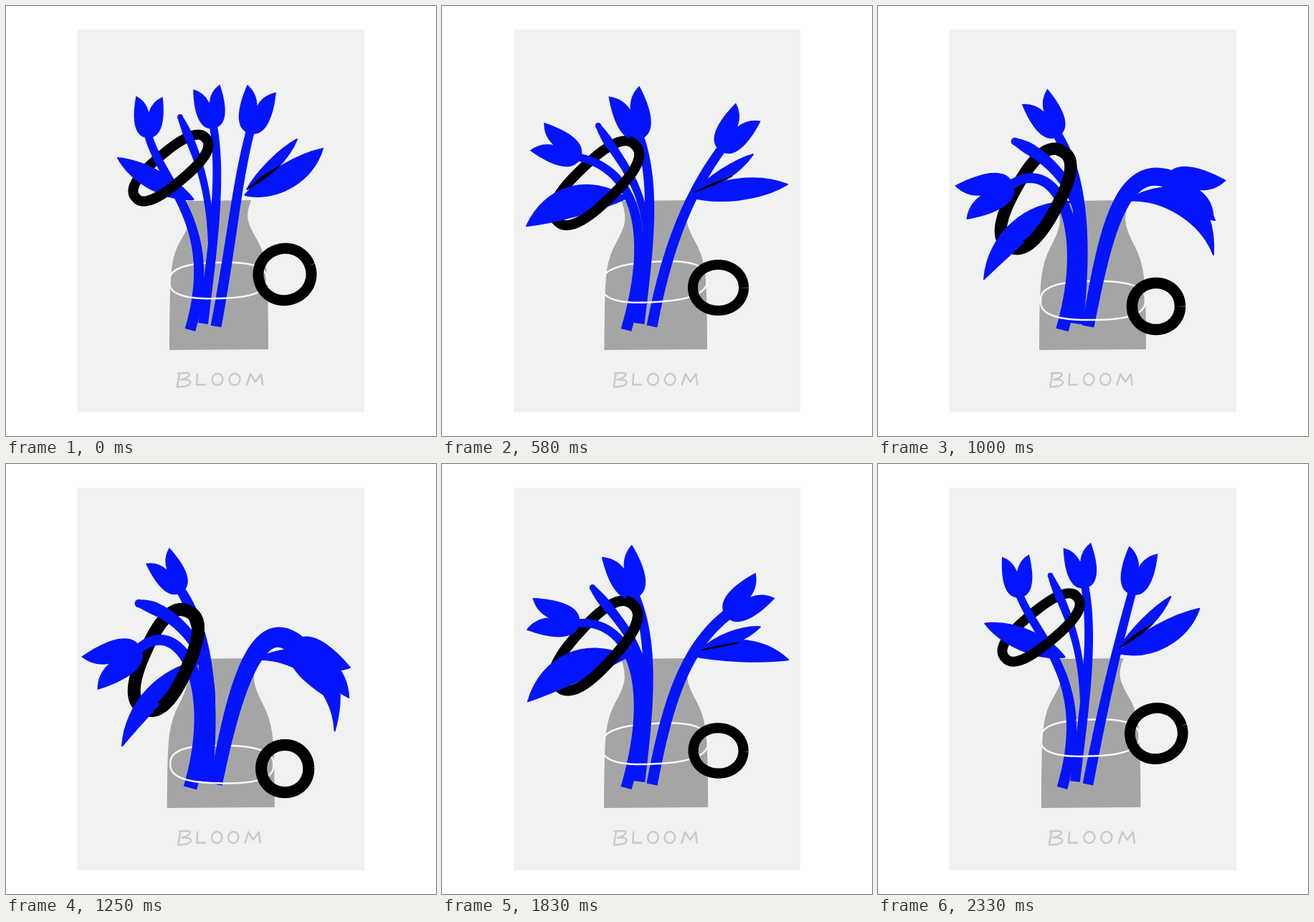
Animation, 600 px wide and 600 px high, one loop 2410 ms. Source, as an HTML page with a canvas:

```html
<!DOCTYPE html>
<html lang="en">
<head>
<meta charset="utf-8">
<title>Bloom</title>
<style>
  html, body { margin: 0; width: 100%; height: 100%; overflow: hidden; background: #fff; }
  canvas { display: block; width: 600px; height: 600px; }
</style>
</head>
<body>
<canvas id="stage" role="img" aria-label="BLOOM: blue tulips wilting in a vase"></canvas>
<script>
const BLUE = '#0414ff', INK = '#000', GLASS = '#a5a5a5', PAPER = '#f0f2f2', CHALK = '#f6f7f7', LETTER = '#c8caca';

// Drawn at 12 pictures a second, most of them held for two ticks.
const LOOP = 2410, TICK = 1000 / 12;
const cuts = [0, 2, 3, 5, 7, 9, 10, 12, 13, 15, 17, 18, 20, 22, 23, 25, 26, 28].map(n => Math.round(n * TICK / 10) * 10);
// How far the bouquet has wilted; the loop runs down this list and back up.
const wilting = [0, .05, .16, .33, .5, .65, .83, 1, 1.07, 1.1];

// Each moving value has three keys: fresh, halfway, wilted.
const flowers = [
  { base: [[198, 184], [193, 213], [189, 249]], angle: [2, -63, -109], size: [58, 68, 78],
    lean: -18, belly: [300, 303], foot: [257, 452], top: [11, 11, 13], end: [15, 15, 18] },
  { base: [[290, 171], [277, 186], [252, 182]], angle: [-10, -19, -31], size: [59, 71, 65],
    lean: 0, belly: [288, 340], foot: [275, 443], top: [11, 12, 13], end: [14, 15, 23] },
  { base: [[340, 178], [388, 202], [402, 240]], angle: [15, 36, 110], size: [65, 67, 80],
    lean: 0, belly: [315, 330], foot: [293, 447], top: [12, 13, 26], end: [15, 15, 17], lead: .2 }
];
// Leaves bulge by so many pixels to either side of the line from base to tip.
const leaves = {
  left: { base: [[262, 270], [258, 268], [268, 273]], tip: [[156, 212], [118, 307], [148, 381]], bulge: [[11, -16], [36, -5], [32, 1]] },
  small: { base: [[336, 256], [352, 260], [390, 255]], tip: [[406, 186], [434, 207], [470, 299]], bulge: [[-6, 9], [-6, 9], [-18, 7]] },
  right: { base: [[333, 264], [345, 266], [345, 272]], tip: [[442, 199], [482, 249], [468, 347]], bulge: [[-9, 24], [-16, 13], [-56, -23]] }
};
const bud = { tip: [[243, 155], [218, 167], [191, 189]], bend: [[265, 205], [245, 214], [232, 207]], width: [13, 14, 18] };
// Ovals: centre, radii, degrees, line width
const water = [[296, 383, 68, 25, -1.5, 2.5], [296, 385, 74, 28, -3.5, 2.5], [300, 411, 73, 27, -.5, 2.5]];
const bigRing = [[230, 226, 64, 22, -40, 14], [215, 247, 76, 28, -44, 14], [220, 269, 76, 31, -61, 17]];
const smallRing = [[389, 374.5, 37, 36, -20, 15], [385.5, 393, 35.5, 32, 0, 14], [388, 419, 33.5, 32.5, 0, 15.5]];
const jarSide = [[252, 272], [259, 290], [253, 312], [235, 341], [228, 385], [228, 480]];

const canvas = document.getElementById('stage');
const ctx = canvas.getContext('2d');
const dpr = window.devicePixelRatio || 1;
canvas.width = canvas.height = 600 * dpr;

// Parabola through the three keys, for numbers or lists of numbers
function at([a, b, c], u) {
  if (Array.isArray(a)) return a.map((v, i) => at([v, b[i], c[i]], u));
  return a + u * (4 * b - 3 * a - c) + u * u * 2 * (a - 2 * b + c);
}

function bezier(a, b, c, d, steps = 32) {
  return Array.from({ length: steps + 1 }, (_, i) => {
    const t = i / steps, s = 1 - t;
    return [0, 1].map(n => s * s * s * a[n] + 3 * s * s * t * b[n] + 3 * s * t * t * c[n] + t * t * t * d[n]);
  });
}

function fill(pts, color) {
  ctx.beginPath();
  pts.forEach(p => ctx.lineTo(p[0], p[1]));
  ctx.closePath();
  ctx.fillStyle = color;
  ctx.fill();
}

// Band along a curve, its width given as a function of 0..1
function band(pts, width, color) {
  const left = [], right = [], last = pts.length - 1;
  pts.forEach((p, i) => {
    const a = pts[Math.max(0, i - 1)], b = pts[Math.min(last, i + 1)];
    const dx = b[0] - a[0], dy = b[1] - a[1];
    const r = width(i / last) / 2 / Math.hypot(dx, dy);
    left.push([p[0] - dy * r, p[1] + dx * r]);
    right.unshift([p[0] + dy * r, p[1] - dx * r]);
  });
  fill(left.concat(right), color);
}

// Step of a given length in a direction counted from straight up
function step([x, y], deg, length) {
  const a = deg * Math.PI / 180;
  return [x + Math.sin(a) * length, y - Math.cos(a) * length];
}

function head(base, deg, size) {
  ctx.save();
  ctx.translate(...base);
  ctx.rotate(deg * Math.PI / 180);
  ctx.scale(size, size);
  ctx.beginPath();
  ctx.moveTo(-.32, -1);
  ctx.quadraticCurveTo(-.07, -.88, 0, -.62);
  ctx.quadraticCurveTo(.07, -.88, .32, -1);
  ctx.bezierCurveTo(.4, -.5, .36, 0, 0, 0);
  ctx.bezierCurveTo(-.36, 0, -.4, -.5, -.32, -1);
  ctx.restore();
  ctx.fillStyle = BLUE;
  ctx.fill();
}

// The stem leaves the head along its axis and curves down to a fixed foot.
function flower(f, u) {
  const v = u + (f.lead || 0) * Math.max(0, u < .5 ? Math.sin(2 * Math.PI * u) : 0);
  const base = at(f.base, v), deg = at(f.angle, v);
  const top = at(f.top, u), end = at(f.end, u);
  const curve = bezier(step(base, deg, 5), step(base, deg + f.lean, -70), f.belly, f.foot);
  band(curve, t => top + (end - top) * t, BLUE);
  head(base, deg, at(f.size, v));
}

function leaf(l, u) {
  const [bx, by] = at(l.base, u), [tx, ty] = at(l.tip, u);
  const dx = tx - bx, dy = ty - by, length = Math.hypot(dx, dy);
  const side = (t, off) => [bx + dx * t - dy / length * off * 4 / 3, by + dy * t + dx / length * off * 4 / 3];
  const [a, b] = at(l.bulge, u);
  ctx.beginPath();
  ctx.moveTo(bx, by);
  ctx.bezierCurveTo(...side(.28, a), ...side(.72, a), tx, ty);
  ctx.bezierCurveTo(...side(.72, b), ...side(.28, b), bx, by);
  ctx.fillStyle = ctx.strokeStyle = BLUE;
  ctx.lineWidth = 2;
  ctx.lineJoin = 'round';
  ctx.fill();
  ctx.stroke();
}

// Dark gap under the small leaf, closing as the leaves fall together
function crease(u) {
  const w = 5 * (1 - u);
  if (w < .5) return;
  const [bx, by] = at(leaves.small.base, u), [tx, ty] = at(leaves.small.tip, u);
  const end = [bx + (tx - bx) * .6 + 4, by + (ty - by) * .6 + 9];
  const mid = [(bx + end[0]) / 2, (by + end[1]) / 2];
  band(bezier([bx, by], mid, mid, end), t => 1.5 + w * .75 * Math.sin(Math.PI * t), INK);
}

function drawBud(u) {
  const tip = at(bud.tip, u), w = at(bud.width, u);
  const curve = bezier(tip, at(bud.bend, u), [284, 248], [286, 330]);
  band(curve, t => w * Math.min(1, Math.sqrt(.3 + t * 5)) * (1 - .35 * t), BLUE);
  ctx.beginPath();
  ctx.arc(...tip, w * .3, 0, 7);
  ctx.fill();
}

// The jar sags: its shoulders sink and its right side swells.
function jar(u) {
  const sink = y => y + 13 * u * Math.sin(Math.PI * (y - 272) / 208);
  const left = jarSide.map(([x, y]) => [x - 3 * u, sink(y)]);
  const right = jarSide.map(([x, y]) => [594 - x + 8 * u, sink(y) - 1]).reverse();
  ctx.beginPath();
  for (const [a, b, c, d, e, f] of [left, right]) {
    ctx.lineTo(...a);
    for (const [p, q] of [[b, c], [c, d], [d, e]]) ctx.quadraticCurveTo(...p, (p[0] + q[0]) / 2, (p[1] + q[1]) / 2);
    ctx.quadraticCurveTo(...e, ...f);
  }
  ctx.fillStyle = GLASS;
  ctx.fill();
}

// Arc of a squarish oval; from 0 to PI is the lower half
function oval([cx, cy, rx, ry, deg, w], color, power, from = 0, to = 2 * Math.PI) {
  const a = deg * Math.PI / 180, cos = Math.cos(a), sin = Math.sin(a);
  const bend = v => Math.sign(v) * Math.abs(v) ** (2 / power);
  ctx.beginPath();
  for (let i = 0; i <= 120; i++) {
    const t = from + (to - from) * i / 120;
    const x = rx * bend(Math.cos(t)), y = ry * bend(Math.sin(t));
    ctx.lineTo(cx + x * cos - y * sin, cy + x * sin + y * cos);
  }
  ctx.strokeStyle = color;
  ctx.lineWidth = w;
  ctx.lineJoin = 'round';
  ctx.lineCap = 'butt';
  ctx.stroke();
}

function lettering(u) {
  ctx.save();
  ctx.translate(238 + 1.5 * u, .5);
  ctx.scale(1 - .04 * u, 1);
  ctx.translate(-238, 0);
  ctx.strokeStyle = LETTER;
  ctx.lineWidth = 2.5;
  ctx.lineCap = ctx.lineJoin = 'round';
  ctx.stroke(new Path2D('M242 513L239 530M240 512C248 511 257 511 256 514C255 518 248 520 244 521' +
    'C252 520 259 522 257 526C255 530 246 531 239 531'));
  ctx.stroke(new Path2D('M267 513L266 528L278 528'));
  ctx.stroke(new Path2D('M336 528L341 513L348 524L356 513L358 528'));
  for (const x of [295, 319]) {
    ctx.beginPath();
    ctx.ellipse(x, 520.5, 7.5, 8, .3, 0, 7);
    ctx.stroke();
  }
  ctx.restore();
}

function draw(u) {
  ctx.setTransform(dpr, 0, 0, dpr, 0, 0);
  ctx.fillStyle = '#fff';
  ctx.fillRect(0, 0, 600, 600);
  ctx.fillStyle = PAPER;
  ctx.fillRect(100, 33, 400, 534);

  jar(u);
  oval(at(water, u), CHALK, 2.6, Math.PI, 2 * Math.PI);
  oval(at(bigRing, u), INK, 2.5);

  Object.values(leaves).forEach(l => leaf(l, u));
  drawBud(u);
  flowers.forEach(f => flower(f, u));
  crease(u);

  // The near side of the ring passes in front of the stems.
  oval(at(bigRing, u), INK, 2.5, -.3, 2.5);
  oval(at(water, u), CHALK, 2.6, 0, Math.PI);
  oval(at(smallRing, u), INK, 2.05);
  lettering(Math.min(1, u));
}

let shown = -1;
const start = performance.now();
function tick() {
  const t = (performance.now() - start) % LOOP;
  const i = cuts.filter(c => c <= t).length - 1;
  const n = Math.min(i, cuts.length - i);
  if (n !== shown) draw(wilting[shown = n]);
  requestAnimationFrame(tick);
}
tick();
</script>
</body>
</html>
```
